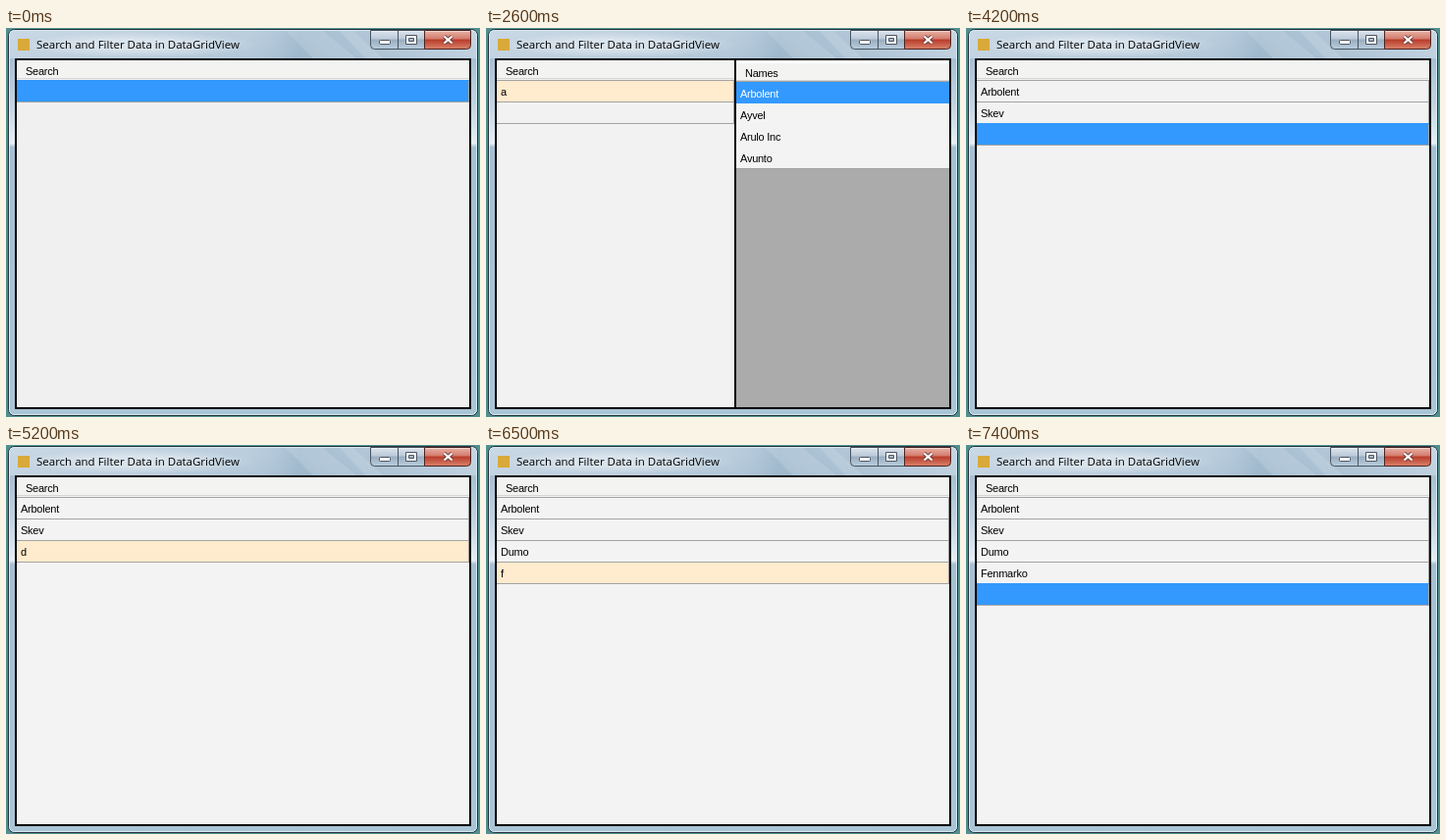
Recreate the animation shown at these times as an HTML page. Size 483 by 397 pixels, loop 8 s.

```html
<!DOCTYPE html>
<html lang="en">
<head>
<meta charset="utf-8">
<title>Search and Filter Data in DataGridView</title>
<style>
  html, body { margin: 0; width: 100%; height: 100%; overflow: hidden; }
  svg { display: block; width: 483px; height: 397px; }
  .title { font: 11.5px "Open Sans", "Noto Sans", sans-serif; }
  .cell { font: 11px "Liberation Sans", Arial, sans-serif; letter-spacing: -.25px; }
</style>
</head>
<body>
<svg viewBox="0 0 483 397" xmlns="http://www.w3.org/2000/svg">
  <defs>
    <linearGradient id="glass" x2="0" y2="1">
      <stop offset="0" stop-color="#b3c8da"/>
      <stop offset=".08" stop-color="#a9c0d3"/>
      <stop offset=".2" stop-color="#c3d4e1"/>
      <stop offset=".295" stop-color="#e6eef4"/>
      <stop offset=".305" stop-color="#a5bed2"/>
      <stop offset="1" stop-color="#a9c5d6"/>
    </linearGradient>
    <linearGradient id="sheen">
      <stop offset="0" stop-color="#fff" stop-opacity=".3"/>
      <stop offset=".5" stop-color="#fff" stop-opacity=".12"/>
      <stop offset=".62" stop-color="#7f9fb8" stop-opacity=".25"/>
      <stop offset="1" stop-color="#fff" stop-opacity=".25"/>
    </linearGradient>
    <radialGradient id="glow">
      <stop offset=".4" stop-color="#fff" stop-opacity=".42"/>
      <stop offset="1" stop-color="#fff" stop-opacity="0"/>
    </radialGradient>
    <linearGradient id="button" x2="0" y2="1">
      <stop offset="0" stop-color="#dce5ed"/>
      <stop offset=".45" stop-color="#bccad8"/>
      <stop offset=".5" stop-color="#9aaec1"/>
      <stop offset="1" stop-color="#b9cddd"/>
    </linearGradient>
    <linearGradient id="close" x2="0" y2="1">
      <stop offset="0" stop-color="#e8b5a9"/>
      <stop offset=".45" stop-color="#d37b6b"/>
      <stop offset=".5" stop-color="#b93c2a"/>
      <stop offset="1" stop-color="#d8836b"/>
    </linearGradient>
  </defs>

  <rect width="483" height="397" fill="#4f8f90"/>
  <rect x="2.5" y="1.5" width="478" height="394" rx="6" fill="url(#glass)" stroke="#26343d"/>
  <rect x="3.5" y="2.5" width="476" height="392" rx="5" fill="none" stroke="#e4f4f9" stroke-opacity=".75"/>
  <rect x="4" y="3" width="475" height="28" fill="url(#sheen)"/>
  <path d="M285 3h38l34 28h-44zM340 3h14l30 28h-18z" fill="#fff" opacity=".13"/>
  <ellipse cx="135" cy="17" rx="122" ry="13" fill="url(#glow)"/>
  <rect x="12" y="11" width="12" height="12" fill="#d9a93a"/>
  <text class="title" x="31" y="21">Search and Filter Data in DataGridView</text>

  <g stroke="#46545f">
    <path d="M371.5 2.5h55v19h-51q-4 0-4-4z" fill="url(#button)"/>
    <path d="M399.5 2.5v19"/>
    <path d="M426.5 2.5h47v15q0 4-4 4h-43z" fill="url(#close)" stroke="#4d2420"/>
  </g>
  <path d="M372.5 3.5h26M400.5 3.5h25M427.5 3.5h45" stroke="#fff" opacity=".5"/>
  <g fill="#fff" stroke="#4c5663">
    <rect x="380.5" y="12.5" width="11" height="4" rx="1"/>
    <path fill-rule="evenodd" d="M407.5 7.5h11v9h-11zM410.5 10.5h5v3h-5z"/>
  </g>
  <path d="M446.5 8.5l8 7m0-7l-8 7" stroke="#6b3a38" stroke-width="4"/>
  <path d="M446.5 8.5l8 7m0-7l-8 7" stroke="#fff" stroke-width="2.3"/>

  <rect x="9" y="31" width="465" height="358"/>
  <g id="grid"></g>
</svg>
<script>
const LOOP = 8000, ROW = 22, LEFT = 11, RIGHT = 472, BOTTOM = 387;
const BLUE = '#3399ff', BEIGE = '#ffebcd', LINE = '#a3a3a3';

// Each search: typing starts, the result list opens, the divider settles, the pick is made.
const searches = [
  { key: 'a', start: 1100, open: 1200, settle: 1200, end: 3000, caret: 21, blinks: [1700, 2100, 2600],
    hits: ['Arbolent', 'Ayvel', 'Arulo Inc', 'Avunto'] },
  { key: 's', start: 3500, open: 3500, settle: 3600, end: 4200, caret: 20, blinks: [4000], hits: ['Skev'] },
  { key: 'd', start: 5200, open: 5300, settle: 5300, end: 5900, caret: 21, blinks: [5700], hits: ['Dumo'] },
  { key: 'f', start: 6500, open: 6600, settle: 6600, end: 7400, caret: 18, blinks: [7000], hits: ['Fenmarko'] }
];

const grid = document.getElementById('grid');
const rect = (x, y, w, h, fill) => `<rect x="${x}" y="${y}" width="${w}" height="${h}" fill="${fill}"/>`;
const text = (x, y, label, fill = '#000') => `<text class="cell" x="${x}" y="${y}" fill="${fill}">${label}</text>`;

function header(x, y, right, label) {
  return rect(x, y, right - x, 19, '#f3f3f2') + rect(x, y, right - x, 1, '#fff') +
    rect(x, y + 18, right - x, 1, '#d5d5d5') + text(x + 9, y + 15, label);
}

function searchRow(index, right, label, fill) {
  const y = 54 + index * ROW;
  return (fill ? rect(LEFT, y - (fill === BLUE), right - LEFT, 21 + (fill === BLUE), fill) : '') +
    rect(LEFT, y + 21, right - LEFT, 1, LINE) + rect(right - 1, y, 1, 21, LINE) + text(15, y + 15, label);
}

function searchPane(t, done, active, open) {
  const right = open ? 253 : RIGHT;
  const shade = t < 1100 ? '#f0f0f0' : t < 5200 ? '#f2f2f2' : '#f3f3f3';
  let out = rect(LEFT, 33, right - LEFT, BOTTOM - 33, shade) + header(LEFT, 33, right, 'Search') +
    rect(LEFT, 53, right - LEFT, 1, LINE);
  done.forEach((s, i) => out += searchRow(i, right, s.hits[0]));
  const current = done.length;
  if (!active) return out + searchRow(current, right, '', BLUE);
  out += searchRow(current, right, active.key, BEIGE);
  if (!open) return out;
  out += searchRow(current + 1, right, '');
  const lit = active.blinks.filter(b => b <= t).length % 2 === 0;
  return out + (lit ? rect(active.caret, 58 + current * ROW, 1, 13, '#000') : '');
}

function namesPane(t, { hits, settle }) {
  const x = 255, w = RIGHT - x;
  let out = rect(x, 33, w, BOTTOM - 33, '#ababab') + header(x, 35, RIGHT, 'Names') +
    rect(x, 33, w, 2, '#fafafa') + rect(x, 54, w, 1, LINE);
  if (t < settle) out += rect(253, 33, 1, BOTTOM - 33, '#e4e4e4');
  hits.forEach((name, i) => {
    const y = 55 + i * ROW;
    out += rect(x, y, w, 22, i ? '#f3f3f3' : BLUE) + rect(x, y + 22, w, 1, LINE) +
      text(259, y + 16, name, i ? '#000' : '#fff');
  });
  return out;
}

let last = '';
function draw(now) {
  const t = now % LOOP;
  const done = searches.filter(s => s.end <= t);
  const active = searches.find(s => s.start <= t && t < s.end);
  const open = active && t >= active.open;
  const markup = searchPane(t, done, active, open) + (open ? namesPane(t, active) : '');
  if (markup !== last) grid.innerHTML = last = markup;
}

const begin = performance.now();
function tick() {
  draw(performance.now() - begin);
  requestAnimationFrame(tick);
}
tick();
</script>
</body>
</html>
```
